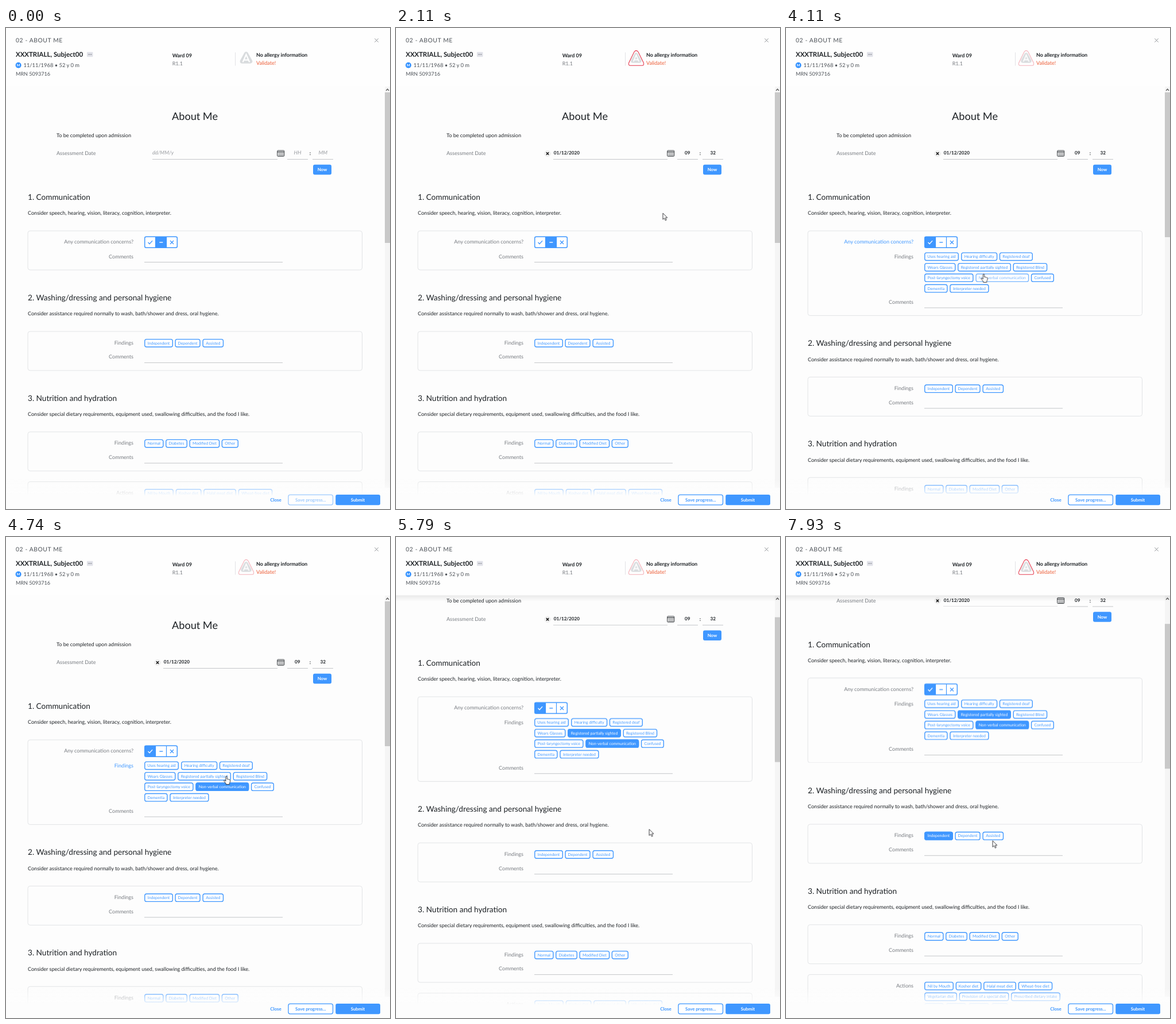
An HTML page for the animation above (8 s loop, 669 px wide and 837 px high).

```html
<!DOCTYPE html>
<html lang="en">
<head>
<meta charset="utf-8">
<title>About Me form</title>
<style>
html, body { margin: 0; width: 100%; height: 100%; overflow: hidden; background: #fdfdfd; }
svg { display: block; width: 100vw; height: 100vh; font-family: Lato, Carlito, sans-serif; font-size: 9.06px; text-rendering: geometricPrecision; }
text { fill: #1c2024; white-space: pre; }
.grey { fill: #777b80; }
.mid { text-anchor: middle; }
.end { text-anchor: end; }
.bold { font-weight: 700; }
.hint { font-style: italic; fill: #9a9da1; }
.btn { font-size: 7.8px; font-weight: 700; text-anchor: middle; }
.chip text { font-size: 6.9px; text-anchor: middle; }
.blue { fill: #3f97ff; }
.white { fill: #fff; }
.line { stroke: #c4c6c9; stroke-width: 1; }
.card { fill: none; stroke: #e2e4e6; }

/* Hard state changes */
.filled-in, .blank, .open, .closed, .verbal, .verbal-hover, .sighted, .indep, .dep-hover,
.focus1, .focus2, .focus3, .lower, .shadow, .cursor, .hand, .arrow {
  animation: 8s step-end infinite;
}
.filled-in { animation-name: filledIn; }
.blank { animation-name: blank; }
.open { animation-name: open; }
.closed { animation-name: closed; }
.verbal { animation-name: verbal; }
.verbal-hover { animation-name: verbalHover; }
.sighted { animation-name: sighted; }
.indep { animation-name: indep; }
.dep-hover { animation-name: depHover; }
.focus1 { animation-name: focus1; }
.focus2 { animation-name: focus2; }
.focus3 { animation-name: focus3; }
.lower { animation-name: lower; }
.shadow { animation-name: shadow; }
.cursor { animation-name: cursorShow; }
.hand { animation-name: hand; }
.arrow { animation-name: arrow; }
@keyframes filledIn { 0% { opacity: 0 } 20.5%, 100% { opacity: 1 } }
@keyframes blank { 0% { opacity: 1 } 20.5%, 100% { opacity: 0 } }
@keyframes open { 0% { opacity: 0 } 41.25%, 100% { opacity: 1 } }
@keyframes closed { 0% { opacity: 1 } 41.25%, 100% { opacity: 0 } }
@keyframes verbal { 0% { opacity: 0 } 53.1%, 100% { opacity: 1 } }
@keyframes verbalHover { 0% { opacity: 1 } 50.3% { opacity: .7 } 53.1%, 100% { opacity: 1 } }
@keyframes sighted { 0% { opacity: 0 } 61.25%, 100% { opacity: 1 } }
@keyframes indep { 0% { opacity: 0 } 90%, 100% { opacity: 1 } }
@keyframes depHover { 0% { opacity: 1 } 80% { opacity: .7 } 87.3% { opacity: 1 } 97.2% { opacity: .7 } 98.4%, 100% { opacity: 1 } }
@keyframes focus1 { 0% { fill: #777b80 } 41.25% { fill: #3f97ff } 53.1%, 100% { fill: #777b80 } }
@keyframes focus2 { 0% { fill: #777b80 } 53.1% { fill: #3f97ff } 67.5%, 100% { fill: #777b80 } }
@keyframes focus3 { 0% { fill: #777b80 } 90% { fill: #3f97ff } 95.5%, 100% { fill: #777b80 } }
@keyframes lower { 0% { transform: translateY(0) } 41.25%, 100% { transform: translateY(79.4px) } }
@keyframes shadow { 0% { opacity: 0 } 70%, 100% { opacity: 1 } }
@keyframes cursorShow { 0% { opacity: 0 } .87% { opacity: 1 } 3.87% { opacity: 0 } 8.62%, 100% { opacity: 1 } }
@keyframes hand { 0% { opacity: 0 } 17% { opacity: 1 } 23% { opacity: 0 } 33.5% { opacity: 1 } 63% { opacity: 0 } 79.5% { opacity: 1 } 93.5%, 100% { opacity: 0 } }
@keyframes arrow { 0% { opacity: 1 } 17% { opacity: 0 } 23% { opacity: 1 } 33.5% { opacity: 0 } 63% { opacity: 1 } 79.5% { opacity: 0 } 93.5%, 100% { opacity: 1 } }

/* Continuous motion */
.scroll { animation: scroll 8s linear infinite; }
@keyframes scroll {
  0%, 69.4% { transform: translateY(0) }
  72.4% { transform: translateY(-75.5px) }
  75%, 100% { transform: translateY(-107.5px) }
}
.thumb { fill: #c9c9c9; animation: thumbMove 8s linear infinite, thumbSize 8s step-end infinite, thumbTint 8s step-end infinite; }
@keyframes thumbMove {
  0%, 69.4% { transform: translateY(0) }
  72.4% { transform: translateY(27.7px) }
  75%, 100% { transform: translateY(39.2px) }
}
@keyframes thumbSize { 0% { height: 262px } 41.25%, 100% { height: 252px } }
@keyframes thumbTint { 0% { fill: #c9c9c9 } 8.62% { fill: #a8a8a8 } 11% { fill: #c9c9c9 } 100% { fill: #c9c9c9 } }
.alert { animation: alert 8s linear infinite; }
@keyframes alert {
  0%, 8.6% { opacity: 0 }
  15.6% { opacity: .6 }
  24%, 38.8% { opacity: 1 }
  49%, 57% { opacity: .38 }
  69%, 72.4% { opacity: .4 }
  81%, 98% { opacity: 1 }
  100% { opacity: .95 }
}
.badge { transform-origin: 418.4px 53px; animation: badge 8s linear infinite; }
@keyframes badge { 0%, 8.6% { transform: scale(1) } 15%, 100% { transform: scale(.86) } }
.path { animation: path 8s linear infinite; }
@keyframes path {
  0%, .87% { transform: translate(655px, 760px) }
  1.87% { transform: translate(590px, 660px) }
  2.87% { transform: translate(600px, 540px) }
  3.87% { transform: translate(680px, 420px) }
  8.62% { transform: translate(668px, 340px) }
  10.6% { transform: translate(655px, 320px) }
  12.5% { transform: translate(590px, 275px) }
  15.62% { transform: translate(533.5px, 249px) }
  18.5%, 22.5% { transform: translate(545px, 247px) }
  25% { transform: translate(510px, 290px) }
  29.4%, 30.4% { transform: translate(367px, 392px) }
  35.4%, 47.7% { transform: translate(248.5px, 377.5px) }
  49.4% { transform: translate(300px, 446px) }
  51.2%, 53.7% { transform: translate(344.5px, 428px) }
  56.2%, 58.2% { transform: translate(415px, 416px) }
  60.6%, 61.9% { transform: translate(345px, 416px) }
  65.6% { transform: translate(440px, 485px) }
  68.1%, 69.3% { transform: translate(461.5px, 504.5px) }
  72.4% { transform: translate(441px, 508.5px) }
  78.2% { transform: translate(350px, 522px) }
  81.2%, 86.2% { transform: translate(315px, 519px) }
  88.7%, 91.2% { transform: translate(268px, 519px) }
  93.7% { transform: translate(340px, 527px) }
  96.1% { transform: translate(357px, 530px) }
  97.2% { transform: translate(338px, 525px) }
  98.1% { transform: translate(345px, 527px) }
  99.1%, 100% { transform: translate(360px, 528.5px) }
}
</style>
</head>
<body>
<script>
const BLUE = '#3f97ff';
const text = (x, y, s, cls = '', extra = '') => `<text x="${x}" y="${y}" class="${cls}" ${extra}>${s}</text>`;
const rule = (x1, x2, y) => `<path class="line" d="M${x1} ${y}H${x2}"/>`;
const card = (y, h, cls = '') => `<rect class="card ${cls}" x="38" y="${y}" width="582.5" height="${h}" rx="4"/>`;
const label = (y, s, cls = '') => text(222, y, s, 'grey end ' + cls);
const comments = y => label(y, 'Comments') + rule(241, 482, y + 7);

// Pill from x1 to x2 centred on y
const chip = (x1, x2, y, s, cls = '', on = false) => `<g class="chip ${cls}">
  <rect x="${x1 + .75}" y="${y - 6.6}" width="${x2 - x1 - 1.5}" height="13.4" rx="3.2"
    fill="${on ? BLUE : '#fff'}" stroke="${BLUE}" stroke-width="1.4"/>
  ${text((x1 + x2) / 2, y + 2.4, s, on ? 'white' : 'blue')}</g>`;
const chips = (y, list) => list.map(([a, b, s, cls]) => chip(a, b, y, s, cls)).join('');

const section = (y, title, note) => text(38, y, title, '', 'font-size="13.6"') + text(38, y + 26.2, note);

// Yes / neutral / no switch with one segment selected
function toggle(sel, cls) {
  const marks = ['M247.5 373l2.6 2.7 5-5.6', 'M267.3 373h6', 'M286 370l6 6m0-6l-6 6'];
  const left = [241.7, 260.5, 279.5];
  const edge = [241.7, 260.5, 279.5, 298.3];
  return `<g class="${cls}"><rect x="241.7" y="363.2" width="56.6" height="19" rx="2.5" fill="#fff"/>
    <rect x="${left[sel]}" y="363.2" width="${edge[sel + 1] - edge[sel]}" height="19" fill="${BLUE}"/>
    <rect x="241.7" y="363.2" width="56.6" height="19" rx="2.5" fill="none" stroke="${BLUE}" stroke-width="1.5"/>
    <path d="M260.5 363v19M279.5 363v19" stroke="${BLUE}" stroke-width="1.2"/>
    ${marks.map((d, i) => `<path d="${d}" fill="none" stroke="${i === sel ? '#fff' : BLUE}" stroke-width="1.4"/>`).join('')}</g>`;
}

const dateRow = `
  ${text(88, 221.4, 'Assessment Date', 'grey')}
  <g class="blank">${text(255, 220.4, 'dd/MM/y', 'hint')}${rule(255, 473, 228.5)}
    ${text(508, 220.4, 'HH', 'hint mid')}${text(552.3, 220.4, 'MM', 'hint mid')}</g>
  <g class="filled-in">
    <circle cx="264" cy="218.5" r="5.2" fill="#f3f3f3" stroke="#e2e2e2" stroke-width=".6"/>
    <path d="M261.8 216.3l4.4 4.4m0-4.4l-4.4 4.4" stroke="#111" stroke-width="1.5"/>
    ${text(274.8, 220.4, '01/12/2020', 'bold', 'font-size="8.1"')}${rule(274, 473, 228.5)}
    ${text(507.8, 220.4, '09', 'bold mid', 'font-size="8.1"')}${text(552.3, 220.4, '32', 'bold mid', 'font-size="8.1"')}</g>
  ${rule(490, 526, 228.5)}${rule(534, 570, 228.5)}${text(530, 221, ':', 'bold mid')}
  <g fill="none" stroke="#33373b"><rect x="472.7" y="213.2" width="12" height="10" rx="1"/>
    <path d="M473 215.6h11.5" stroke-width="1.3"/>
    <path d="M474.5 218h9m-9 2h9m-9 2h9" stroke-dasharray="1.2 .7" stroke-width="1"/></g>
  <rect x="535" y="237.8" width="32" height="17.4" rx="3" fill="${BLUE}"/>${text(551, 249.3, 'Now', 'btn white')}`;

const concerns = `
  ${card(353, 68, 'closed')}${card(353, 147.4, 'open')}
  ${label(375.4, 'Any communication concerns?', 'focus1')}
  ${toggle(1, 'closed')}${toggle(0, 'open')}
  <g class="open">${label(400.6, 'Findings', 'focus2')}
    ${chips(397.7, [[241, 301, 'Uses hearing aid'], [305, 368.3, 'Hearing difficulty'], [371.7, 430, 'Registered deaf']])}
    ${chips(416.2, [[241, 295.5, 'Wears Glasses'], [299, 392, 'Registered partially sighted'], [395.5, 455.3, 'Registered Blind']])}
    ${chips(434.6, [[241, 326.6, 'Post-laryngectomy voice'], [330.3, 423.3, 'Non-verbal communication', 'verbal-hover'], [426.8, 467, 'Confused']])}
    ${chips(453.1, [[241, 281.6, 'Dementia'], [285.2, 353.6, 'Interpreter needed']])}
    ${chip(299, 392, 416.2, 'Registered partially sighted', 'sighted', true)}
    ${chip(330.3, 423.3, 434.6, 'Non-verbal communication', 'verbal', true)}</g>`;

const lower = `<g class="lower">
  ${comments(400.5)}
  ${section(474, '2. Washing/dressing and personal hygiene', 'Consider assistance required normally to wash, bath/shower and dress, oral hygiene.')}
  ${card(528, 68)}${label(550.6, 'Findings', 'focus3')}
  ${chips(548.2, [[241, 291, 'Independent'], [294.3, 338.7, 'Dependent', 'dep-hover'], [342.3, 379.2, 'Assisted']])}
  ${chip(241, 291, 548.2, 'Independent', 'indep', true)}
  ${comments(575.4)}
  ${section(649, '3. Nutrition and hydration', 'Consider special dietary requirements, equipment used, swallowing difficulties, and the food I like.')}
  ${card(702.8, 68)}${label(725.3, 'Findings')}
  ${chips(723, [[241, 274.6, 'Normal'], [278, 316, 'Diabetes'], [319.4, 372.3, 'Modified Diet'], [375.6, 405, 'Other']])}
  ${comments(750.2)}
  ${card(789.5, 140)}${label(812.2, 'Actions')}
  ${chips(809.3, [[241, 292, 'Nil by Mouth'], [295.6, 340.5, 'Kosher diet'], [344, 401, 'Halal meat diet'], [404.6, 464.3, 'Wheat-free diet']])}
  ${chips(828, [[241, 298, 'Vegetarian diet'], [301.6, 388.4, 'Provision of a special diet'], [392, 478, 'Prescribed dietary intake']])}
  ${chips(846.4, [[241, 275, 'Vegan'], [278.6, 314, 'Pureed'], [318, 354, 'Low salt'], [358, 387, 'Soft']])}
</g>`;

const header = `
  <rect class="shadow" y="101" width="669" height="11" fill="url(#drop)"/>
  <rect width="669" height="101.5" fill="#fefefe"/>
  ${text(17, 25.4, '02 - ABOUT ME', '', 'font-size="10.3" letter-spacing=".6" style="fill:#4b5056"')}
  <path d="M642.3 18.3l6.4 6.4m0-6.4l-6.4 6.4" stroke="#85898d" stroke-width=".9"/>
  ${text(17, 49.8, 'XXXTRIALL, Subject00', 'bold', 'font-size="11.45"')}
  <rect x="141" y="41.8" width="10.4" height="8.4" rx="1" fill="#e1e2e9"/>
  <path d="M143.4 46h6.2" stroke="#4b5056" stroke-width="1.2" stroke-dasharray="1.2 1.1"/>
  <circle cx="21.6" cy="64.8" r="5" fill="#2f8fff"/>${text(21.6, 67.1, 'M', 'bold mid white', 'font-size="6.4"')}
  ${text(30.5, 68, '11/11/1968 • 52 y 0 m', '', 'font-size="9.35" style="fill:#4b5056"')}
  ${text(17, 83, 'MRN 5093716', '', 'style="fill:#4b5056"')}
  ${text(289.7, 51, 'Ward 09', 'bold', 'font-size="8.95"')}${text(289.7, 64.8, 'R1.1', 'grey')}
  <path d="M399.5 42.5v23" stroke="#e2e3e5"/>
  <g class="badge"><path d="M418.4 45.2L425.4 58H411.4z" fill="#d9dcde" stroke="#d9dcde" stroke-width="7.6" stroke-linejoin="round"/>
    <path d="M412.6 59.4l5.8-13.2 5.8 13.2M414.6 55.6h7.6" fill="none" stroke="#fff" stroke-width="2.2"/></g>
  <path class="alert" d="M421.9 41.5L431.2 60.3Q433 65 428.5 65.3H408.5Q404 65 405.8 60.3L415 41.5Q418.4 37.3 421.9 41.5z" fill="none" stroke="#e4374c" stroke-width="1.1"/>
  ${text(436, 50.2, 'No allergy information', 'bold', 'font-size="8.95"')}
  ${text(436, 63.6, 'Validate!', '', 'style="fill:#ec5a33"')}`;

const footer = `
  <rect y="784" width="669" height="33" fill="url(#fade)"/><rect y="816.5" width="669" height="21" fill="#fdfdfd"/>
  ${text(470, 823.6, 'Close', 'btn blue', 'style="font-size:8px"')}
  ${['blank', 'filled-in'].map((cls, i) => `<g class="${cls}"><g opacity="${i ? 1 : .5}">
    <rect x="491.9" y="812.4" width="77.6" height="17.4" rx="3" fill="#fff" stroke="${BLUE}" stroke-width="1.3"/>
    ${text(530.7, 823.6, 'Save progress...', 'btn blue')}</g></g>`).join('')}
  <rect x="574.2" y="811.9" width="77.8" height="18.4" rx="3" fill="${BLUE}"/>${text(613, 823.6, 'Submit', 'btn white')}`;

const scrollbar = `<rect x="660" y="102" width="9" height="698" fill="#f5f5f5"/>
  <path d="M662.2 109l2.4-2.8 2.4 2.8" fill="none" stroke="#505050" stroke-width="1.2"/>
  <rect class="thumb" x="660" y="112" width="9" height="262"/>`;

const pointer = `<g class="cursor"><g class="path" fill="#fff" stroke="#26282b" stroke-width=".9" stroke-linejoin="round">
  <path class="arrow" d="M0 0V11L2.5 8.7 4.4 12.7 6.2 11.9 4.4 8H7.9z"/>
  <path class="hand" d="M-1.2 .8Q0-.8 1 .8V5.2Q2.4 4.6 3 5.8 4.4 5 5 6.4 6.6 6 6.6 7.8 6.6 11 5.2 12.6V14.5H-.8V13L-4.6 8.4Q-4.4 6.6-2.8 7.6L-1.2 9z"/>
</g></g>`;

document.body.innerHTML = `<svg viewBox="0 0 669 837" preserveAspectRatio="none">
  <defs>
    <linearGradient id="fade" x2="0" y2="1"><stop stop-color="#fdfdfd" stop-opacity="0"/><stop offset=".92" stop-color="#fdfdfd"/></linearGradient>
    <linearGradient id="drop" x2="0" y2="1"><stop stop-color="#000" stop-opacity=".08"/><stop offset="1" stop-color="#000" stop-opacity="0"/></linearGradient>
  </defs>
  <rect width="669" height="837" fill="#fdfdfd"/>
  <g class="scroll">
    ${text(329, 159.6, 'About Me', 'mid', 'font-size="18.1"')}
    ${text(88, 189.6, 'To be completed upon admission')}
    ${dateRow}
    ${section(299, '1. Communication', 'Consider speech, hearing, vision, literacy, cognition, interpreter.')}
    ${concerns}${lower}
  </g>
  ${scrollbar}${footer}${header}${pointer}
</svg>`;
</script>
</body>
</html>
```
